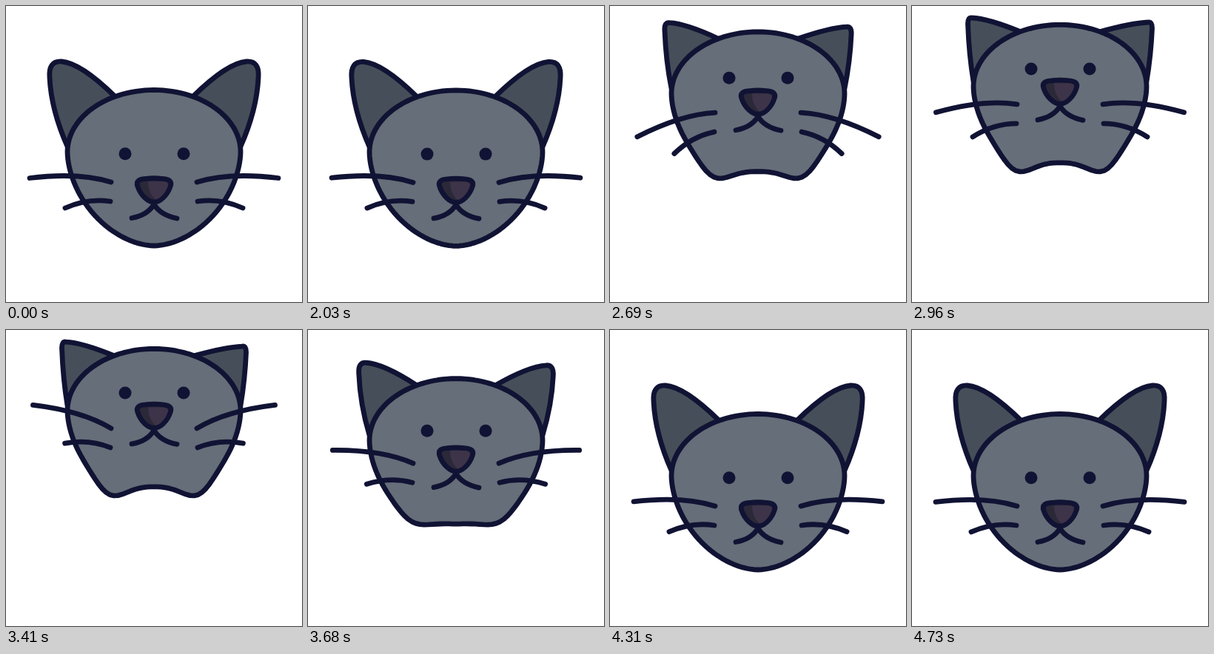
Recreate the animation shown at these times as an HTML page. Size 400 by 400 pixels, loop 4760 ms.

```html
<!DOCTYPE html>
<html lang="en">
<head>
<meta charset="utf-8">
<title>Jumping cat</title>
<style>
  html, body { margin: 0; width: 100%; height: 100%; overflow: hidden; background: #fff; }
  svg { display: block; width: 100vw; height: 100vh; }
  .line { stroke: #111334; stroke-width: 6.8; stroke-linecap: round; stroke-linejoin: round; fill: none; }
  .ear { fill: #464f59; }
  .head { fill: #666e79; }
  .eye { fill: #111334; }
  .nose { fill: #2b2838; }
  .shine { fill: #3d3449; }
</style>
</head>
<body>
<svg viewBox="0 0 400 400">
  <defs>
    <g id="whiskers">
      <path class="line whisker" d="M0 0C-29 -9 -65 -11 -110 -5.5" data-x="142" data-y="238"/>
      <path class="line whisker" d="M0 0C-20 -3 -41 0 -61 9" data-x="141" data-y="264"/>
    </g>
  </defs>
  <path id="leftEar" class="line ear"/>
  <path id="rightEar" class="line ear" transform="matrix(-1 0 0 1 400 0)"/>
  <path id="head" class="line head"/>
  <g id="eyes" class="eye">
    <circle cx="161" cy="199.7" r="8.5"/>
    <circle cx="240" cy="199.7" r="8.5"/>
  </g>
  <g id="muzzle">
    <path class="line nose" d="M178 244C175 236 181 234 188 233.5Q200 232 212 233.5C220 234 225 237 222 244C218 256 208 265 200 265C192 265 182 256 178 244Z"/>
    <path class="shine" d="M192 237H211C218 237 220 240 218.5 244C215 254 207 261 202 261.5C196 256 192 248 192 237Z"/>
    <path class="line" d="M170 286.5C184 284 194 278 200 268C206 278 216 284 231 287"/>
  </g>
  <use href="#whiskers"/>
  <use href="#whiskers" transform="matrix(-1 0 0 1 400 0)"/>
</svg>
<script>
const LOOP = 4760, START = 2030, STEP = 30;

// Key points of an ear, inner base to outer base: at rest and at the top of the jump.
const EAR_REST = [[147, 122], [101, 77], [75, 75], [57, 74], [59, 97], [61, 140], [83, 190]];
const EAR_TOP = [[147, 35], [103, 17], [81, 16], [75.5, 15], [75.5, 24], [77, 66], [83, 102]];

const $ = id => document.getElementById(id);
const whiskers = document.querySelectorAll('.whisker');
const lerp = (a, b, f) => a + (b - a) * f;

// Smooth step from 0 to 1 between two times.
function ease(t, from, to) {
  const u = Math.min(1, Math.max(0, (t - from) / (to - from)));
  return u * u * (3 - 2 * u);
}

function earPath(dip, jump, sag) {
  const [base, ...curve] = EAR_REST.map(([x, y], i) => {
    const [topX, topY] = EAR_TOP[i];
    const tip = i > 0 && i < 5 ? sag : 0;
    return [lerp(x, topX, jump), lerp(y + dip, topY + tip, jump)];
  });
  return `M${base}Q${curve.join(' ')}`;
}

// The chin tucks in at the middle and bulges at both corners.
const tuck = d => 24 * (1 - (d / 45) ** 2) * Math.exp(-((d / 66) ** 4));

function headPath(dip, jump) {
  const points = [], count = 120;
  for (let i = 0; i < count; i++) {
    const a = i / count * 2 * Math.PI, c = Math.cos(a), s = Math.sin(a);
    const lower = s > 0, power = lower ? 2 / 1.8 : 1;
    const dx = 117 * Math.sign(c) * Math.abs(c) ** power;
    const dy = (lower ? 127 : 83.5) * Math.sign(s) * Math.abs(s) ** power;
    const chin = lower ? tuck(dx) * jump : 0;
    points.push(`${200 + dx} ${197 + dy + dip - 97.5 * jump - chin}`);
  }
  return `M${points.join('L')}Z`;
}

function draw(t) {
  const dip = 9.3 * (ease(t, 2000, 2233) - ease(t, 4033, 4267));
  const jump = ease(t, 2233, 2800) - ease(t, 3400, 4033);
  const droop = -8 * ease(t, 2000, 2233) + 28.5 * ease(t, 2233, 2520)
    - 34.5 * ease(t, 2640, 3450) + 26.5 * ease(t, 3450, 4100)
    - 18.5 * ease(t, 4100, 4433) + 6 * ease(t, 4433, 4745);
  const shift = travel => dip - travel * jump;

  $('leftEar').setAttribute('d', earPath(dip, jump, 0));
  $('rightEar').setAttribute('d', earPath(dip, jump, 6));
  $('head').setAttribute('d', headPath(dip, jump));
  $('eyes').setAttribute('transform', `translate(0 ${shift(124)})`);
  $('muzzle').setAttribute('transform', `translate(0 ${shift(142)})`);
  for (const w of whiskers) {
    const y = +w.dataset.y + shift(114.5);
    w.setAttribute('transform', `translate(${w.dataset.x} ${y}) rotate(${-droop})`);
  }
}

function tick(now) {
  const t = now % LOOP;
  draw(t < START ? 0 : START + Math.floor((t - START) / STEP) * STEP);
  requestAnimationFrame(tick);
}
draw(0);
requestAnimationFrame(tick);
</script>
</body>
</html>
```
